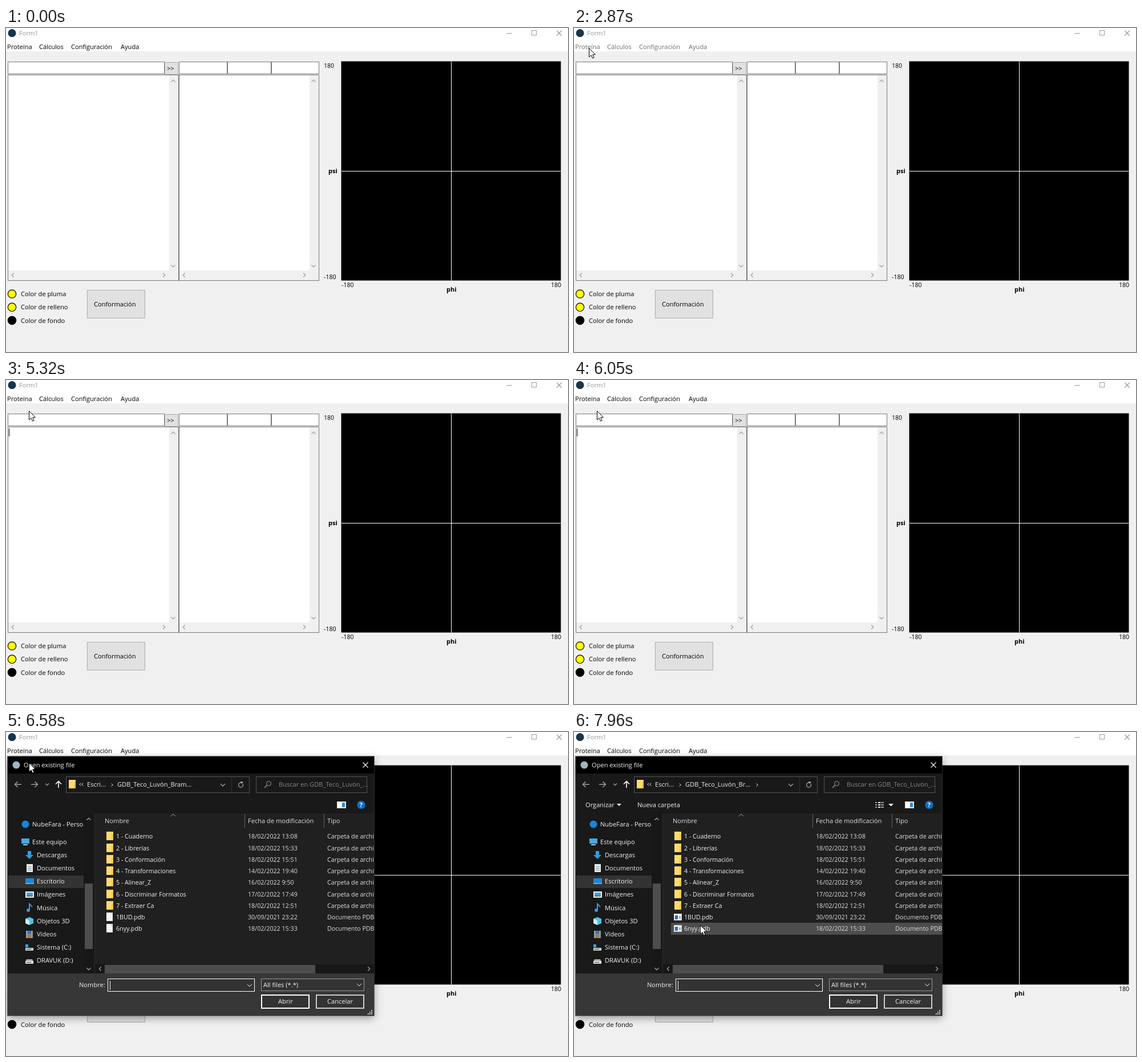
These frames come from a looping animation (985 by 569 pixels, 8 s). An HTML page with a canvas:

```html
<!DOCTYPE html>
<html lang="es">
<head>
<meta charset="utf-8">
<title>Form1</title>
<style>
html, body { margin: 0; width: 100%; height: 100%; overflow: hidden; background: #f0f0f0; }
canvas { display: block; width: 985px; height: 569px; }
</style>
</head>
<body>
<canvas id="stage" width="985" height="569"></canvas>
<script>
const LOOP = 8000;
const stage = document.getElementById('stage');
const screen2d = stage.getContext('2d');
const layer = document.createElement('canvas');
layer.width = stage.width;
layer.height = stage.height;
const layer2d = layer.getContext('2d');
let g = screen2d;

const clamp = v => Math.max(0, Math.min(1, v));
const ramp = (t, a, b) => clamp((t - a) / (b - a));
const within = (p, x, y, w, h) => p && p.x >= x && p.x < x + w && p.y >= y && p.y < y + h;

function fill(x, y, w, h, color) {
  g.fillStyle = color;
  g.fillRect(x, y, w, h);
}

function frame(x, y, w, h, border, color, lw = 1) {
  if (color) fill(x, y, w, h, color);
  g.strokeStyle = border;
  g.lineWidth = lw;
  g.strokeRect(x + lw / 2, y + lw / 2, w - lw, h - lw);
}

// y is the optical middle of the line
function text(s, x, y, color = '#000', size = 11.1, weight = 400) {
  g.font = `${weight} ${size}px "Open Sans", "Noto Sans", sans-serif`;
  g.fillStyle = color;
  g.fillText(s, x, y + 4);
}

function line(color, lw, ...pts) {
  g.strokeStyle = color;
  g.lineWidth = lw;
  g.beginPath();
  for (let i = 0; i < pts.length; i += 2) g.lineTo(pts[i], pts[i + 1]);
  g.stroke();
}

function shape(color, ...pts) {
  g.fillStyle = color;
  g.beginPath();
  for (let i = 0; i < pts.length; i += 2) g.lineTo(pts[i], pts[i + 1]);
  g.closePath();
  g.fill();
}

function disc(x, y, r, color, border) {
  g.beginPath();
  g.arc(x, y, r, 0, 7);
  g.fillStyle = color;
  g.fill();
  if (border) {
    g.strokeStyle = border;
    g.lineWidth = 1.2;
    g.stroke();
  }
}

function chevron(x, y, dir, color, s = 3.5, lw = 1.3) {
  const h = s / 2;
  if (dir === 'up') line(color, lw, x - s, y + h, x, y - h, x + s, y + h);
  if (dir === 'down') line(color, lw, x - s, y - h, x, y + h, x + s, y - h);
  if (dir === 'left') line(color, lw, x + h, y - s, x - h, y, x + h, y + s);
  if (dir === 'right') line(color, lw, x - h, y - s, x + h, y, x - h, y + s);
}

function cross(x, y, r, color) {
  line(color, 1.1, x - r, y - r, x + r, y + r);
  line(color, 1.1, x + r, y - r, x - r, y + r);
}

// ---- pointer: start, end, steps, then a quadratic curve ----
const moves = [
  [650, 1280, 10, 952, 559, 690, 468, 439, 495],
  [1550, 2310, 11, 439, 495, 250, 180, 62, 59],
  [2380, 2590, 4, 62, 59, 35, 22, 26, 35],
  [3970, 4650, 9, 26, 35, 32, 50, 28, 42],
  [4920, 4920, 1, 28, 42, 34, 44, 40, 46],
  [5060, 5320, 5, 40, 46, 40, 50, 40, 54],
  [7110, 7890, 12, 40, 54, 130, 165, 224, 330],
  [7960, 7960, 1, 224, 330, 222, 335, 221, 339]
];

function pointerAt(t) {
  if (t < 450) return null;
  let pos = { x: 952, y: 559 };
  for (const [a, b, n, x0, y0, cx, cy, x1, y1] of moves) {
    if (t < a) break;
    const k = n > 1 ? Math.min(n, 1 + Math.floor((t - a) / (b - a) * (n - 1) + 1e-6)) : 1;
    const u = k / n, p = u * u * (3 - 2 * u), q = 1 - p;
    pos = {
      x: Math.round(q * q * x0 + 2 * p * q * cx + p * p * x1),
      y: Math.round(q * q * y0 + 2 * p * q * cy + p * p * y1)
    };
  }
  return pos;
}

function drawPointer({ x, y }) {
  g.save();
  g.translate(x + .5, y + .5);
  g.beginPath();
  [[0, 0], [0, 15.5], [3.6, 12.2], [6, 17.6], [8.6, 16.5], [6.2, 11.3], [10.8, 11.1]]
    .forEach(p => g.lineTo(...p));
  g.closePath();
  g.fillStyle = '#fff';
  g.fill();
  g.strokeStyle = '#000';
  g.lineWidth = 1;
  g.stroke();
  g.restore();
}

// ---- main window ----
function field(p, x, y, w, h) {
  frame(x, y, w, h, within(p, x, y, w, h) ? '#171717' : '#7a7a7a', '#fff');
}

function memo(p, x, w) {
  field(p, x, 82, w, 362);
  const r = x + w - 1, c = '#a3a3a3';
  fill(r - 16, 83, 16, 360, '#f0f0f0');
  fill(x + 1, 426, w - 2, 17, '#f0f0f0');
  chevron(r - 9, 93, 'up', c);
  chevron(r - 9, 418, 'down', c);
  chevron(x + 9, 434, 'left', c);
  chevron(r - 25, 434, 'right', c);
}

function drawMenu(t) {
  const a = ramp(t, 3080, 3290);
  if (a <= 0 || t >= 5130) return;
  g.globalAlpha = a;
  frame(0, 42, 154, 28, '#ccc', '#f2f2f2');
  g.globalAlpha = a * ramp(t, 3970, 4200);
  fill(3, 45, 148, 22, '#91c9f7');
  g.globalAlpha = a;
  text('Abrir archivo', 32, 56);
  g.globalAlpha = 1;
}

function drawMain(t, p) {
  const active = t >= 3010 && t < 5200;
  const ink = active ? '#000' : '#999';
  const over = t < 6050 ? p : null;
  fill(0, 0, 985, 569, '#f0f0f0');
  fill(0, 0, 985, 41, '#fff');
  disc(10.5, 9, 7, '#1c3446');
  text('Form1', 23, 9, ink);
  line(ink, 1, 877, 9.5, 887, 9.5);
  frame(921, 4, 9, 9, ink);
  cross(969.5, 9, 4.5, ink);

  if (t >= 3080 && t < 5130) frame(0, 25, 50, 17, '#99d1ff', '#cce8ff');
  const menuInk = t >= 2450 && t < 3010 ? '#6d6d6d' : '#000';
  text('Proteína', 2, 33, menuInk);
  text('Cálculos', 58, 33, menuInk);
  text('Configuración', 114, 33, menuInk);
  text('Ayuda', 201, 33, menuInk);

  field(over, 3, 59, 275, 22);
  frame(278, 60, 24, 22, '#adadad', '#e1e1e1');
  text('>>', 282, 71);
  field(over, 303, 59, 85, 22);
  field(over, 388, 59, 77, 22);
  field(over, 465, 59, 84, 22);
  memo(over, 3, 300);
  memo(over, 303, 246);

  const focus = Math.min(ramp(t, 2940, 3290), 1 - ramp(t, 5060, 5320));
  if (focus > 0) {
    g.globalAlpha = focus;
    frame(3, 82, 300, 362, '#0078d7');
    g.globalAlpha = 1;
  }
  if (t >= 3080) fill(5, 85, 1, 14, '#000');

  fill(587.5, 58.5, 385, 385, '#000');
  fill(780, 59, 1, 384, '#fff');
  fill(588, 251, 384, 1, '#fff');
  text('180', 557, 66, '#000', 10.6);
  text('-180', 557, 437, '#000', 10.6);
  text('-180', 588, 451, '#000', 10.6);
  text('180', 955, 451, '#000', 10.6);
  text('psi', 565, 251, '#000', 11, 700);
  text('phi', 772, 459, '#000', 11, 700);

  [['pluma', '#ff0'], ['relleno', '#ff0'], ['fondo', '#000']].forEach(([s, c], i) => {
    const y = 467 + i * 23.3;
    disc(10.5, y, 7.2, c, '#000');
    text('Color de ' + s, 26, Math.round(y));
  });
  frame(142, 460, 102, 50, '#adadad', '#e1e1e1');
  text('Conformación', 154, 485);
  drawMenu(t);
}

// ---- file dialog ----
const box = { x: 3, y: 43, w: 642, h: 455 };
const folders = ['1 - Cuaderno', '2 - Librerías', '3 - Conformación', '4 - Transformaciones',
  '5 - Alinear_Z', '6 - Discriminar Formatos', '7 - Extraer Ca'];
const files = [...folders, '1BUD.pdb', '6nyy.pdb'];
const dates = ['18/02/2022 13:08', '18/02/2022 15:33', '18/02/2022 15:51', '14/02/2022 19:40',
  '16/02/2022 9:50', '17/02/2022 17:49', '18/02/2022 12:51', '30/09/2021 23:22', '18/02/2022 15:33'];
const places = ['Este equipo', 'Descargas', 'Documentos', 'Escritorio', 'Imágenes', 'Música',
  'Objetos 3D', 'Vídeos', 'Sistema (C:)', 'DRAVUK (D:)'];
const pale = '#f2f2f2', dim = '#a0a0a0';

function folder(x, y) {
  fill(x, y, 12, 15, '#ffd971');
  fill(x + 9, y + 4, 3, 11, '#f5c64f');
}

const placeIcons = [
  y => { fill(27, y - 6, 14, 9, '#4aa8e0'); fill(30, y + 4, 8, 2, '#9bd0ee'); },
  y => shape('#2f9be6', 38, y - 7, 44, y - 7, 44, y, 48, y, 41, y + 7, 34, y, 38, y),
  y => { fill(36, y - 7, 11, 14, '#eee'); [-3, 0, 3].forEach(d => fill(38, y + d, 7, 1, '#6b8ba0')); },
  y => { fill(34, y - 5, 15, 10, '#1c87d6'); fill(34, y + 3, 15, 2, '#55b5f0'); },
  y => { fill(34, y - 5, 15, 11, '#eee'); fill(36, y - 3, 11, 7, '#4aa0d8'); fill(36, y + 2, 11, 2, '#3d7c68'); },
  y => { disc(39, y + 4, 3, '#2f9be6'); line('#2f9be6', 2, 41, y + 4, 41, y - 7, 46, y - 2); },
  y => { shape('#4fc3e8', 41, y - 7, 48, y - 4, 48, y + 4, 41, y + 7, 34, y + 4, 34, y - 4);
         shape('#c9f0fb', 34, y - 4, 41, y - 1, 41, y + 7, 34, y + 4); },
  y => { fill(35, y - 6, 12, 13, '#8d9aa5'); fill(38, y - 6, 6, 6, '#2f78b8'); fill(38, y + 1, 6, 6, '#b8763f'); },
  y => { fill(34, y - 5, 5, 5, '#36a3e8'); fill(34, y + 1, 14, 5, '#ccc'); fill(36, y + 3, 8, 1, '#444'); },
  y => { shape('#aaa', 36, y - 2, 46, y - 2, 48, y + 2, 34, y + 2); fill(34, y + 1, 14, 5, '#ddd'); fill(36, y + 3, 8, 1, '#444'); }
];

function drawTitle() {
  fill(box.x, box.y, box.w, 30, '#000');
  disc(18, 58, 6.5, '#9fb6c4');
  text('Open existing file', 31, 58, pale);
  cross(630, 58, 4.5, '#fff');
}

function drawBlank() {
  fill(box.x, 73, box.w, 351, '#fff');
  fill(173, 408, 455, 16, '#171717');
  fill(173, 408, 368, 16, '#4d4d4d');
  [[128, 437, 45, 14], [178, 433, 258, 23], [447, 433, 181, 22], [447, 461, 85, 25],
   [543, 461, 85, 25], [628, 481, 17, 17]].forEach(r => fill(...r, '#fff'));
}

function drawNav(ready) {
  line(dim, 1.5, 27, 92, 16, 92);
  chevron(18, 92, 'left', dim, 5, 1.5);
  line(dim, 1.5, 44, 92, 55, 92);
  chevron(53, 92, 'right', dim, 5, 1.5);
  chevron(72, 92, 'down', dim, 3);
  line('#fff', 1.6, 92, 98, 92, 87);
  chevron(92, 89, 'up', '#fff', 5, 1.6);
  frame(105, 78, 322, 29, '#535353', '#191919');
  folder(110, 84);
  chevron(130, 92, 'left', pale, 2.5, 1);
  chevron(134, 92, 'left', pale, 2.5, 1);
  text('Escri...', 142, 92, pale);
  chevron(186, 93, 'right', pale, 2.5, 1);
  text(ready ? 'GDB_Teco_Luvón_Br...' : 'GDB_Teco_Luvón_Bram...', 195, 92, pale);
  if (ready) chevron(321, 93, 'right', pale, 2.5, 1);
  chevron(380, 93, 'down', dim, 4);
  fill(395, 79, 1, 27, '#333');
  g.strokeStyle = dim;
  g.lineWidth = 1.3;
  g.beginPath();
  g.arc(411.5, 93, 4, -.6, 4.6);
  g.stroke();
  fill(411, 87, 4, 3, dim);
  frame(438, 78, 195, 29, '#535353', '#191919');
  g.strokeStyle = dim;
  g.beginPath();
  g.arc(460.5, 90.5, 4, 0, 7);
  g.stroke();
  line(dim, 1.3, 457.5, 93.5, 453, 98);
  text('Buscar en GDB_Teco_Luvón_...', 478, 92, '#868686');

  if (ready) {
    text('Organizar', 20, 128, pale);
    shape(pale, 75, 126, 83, 126, 79, 130);
    text('Nueva carpeta', 111, 128, pale);
    [123, 127, 131].forEach(y => {
      fill(528, y, 3, 2, dim);
      fill(533, y, 4, 2, pale);
      fill(538, y, 5, 2, dim);
    });
    shape(pale, 551, 126, 560, 126, 555.5, 130.5);
  }
  frame(580, 122, 16, 12, '#ddd', '#fff');
  fill(589, 124, 5, 8, '#2f86c9');
  disc(622.5, 128, 7.3, '#0f6cbf');
  text('?', 619.8, 128, '#fff', 11, 700);
}

function drawSide() {
  fill(4, 252, 132, 22, '#333');
  disc(34, 162, 6.5, '#1b84d8');
  g.save();
  g.beginPath();
  g.rect(3, 143, 133, 281);
  g.clip();
  text('NubeFara - Personal', 46, 162, pale);
  places.forEach((s, i) => {
    const y = Math.round(193 + i * 23.1);
    placeIcons[i](y);
    text(s, i ? 54 : 46, y, pale);
  });
  g.restore();
  fill(137, 144, 16, 280, '#171717');
  fill(138, 266, 14, 115, '#4d4d4d');
  chevron(145, 153, 'up', dim);
  chevron(145, 416, 'down', dim);
  fill(155, 143, 1, 281, '#2b2b2b');
}

function drawList(ready, p) {
  const size = 10.7;
  fill(156, 143, 489, 281, '#202020');
  chevron(293, 146, 'up', dim, 4, 1);
  fill(418, 144, 1, 24, '#636363');
  fill(557, 144, 1, 24, '#636363');
  text('Nombre', 173, 156, '#dedede');
  text('Fecha de modificación', 424, 156, '#dedede');
  text('Tipo', 563, 156, '#dedede');
  files.forEach((s, i) => {
    const y = Math.round(183.4 + i * 20.25), top = y - 10;
    if (within(p, 170, top, 475, 20)) fill(170, top, 475, 21, '#4d4d4d');
    if (i < folders.length) folder(176, y - 8);
    else if (ready) {
      frame(175, y - 6, 14, 12, '#ccc', '#fff');
      fill(177, y - 3, 5, 7, '#2b6cb0');
      fill(184, y - 2, 3, 5, '#9ab');
    } else {
      fill(176, y - 8, 11, 15, '#f4f4f4');
      shape('#bbb', 184, y - 8, 187, y - 5, 184, y - 5);
    }
    text(s, 193, y, pale, size);
    text(dates[i], 424, y, '#dedede', size);
    text(i < folders.length ? 'Carpeta de archivos' : 'Documento PDB', 563, y, '#dedede', size);
  });
  fill(156, 408, 489, 16, '#171717');
  fill(173, 409, 369, 15, '#4d4d4d');
  chevron(165, 416, 'left', dim);
  chevron(636, 416, 'right', dim);
}

function drawFooter(t) {
  text('Nombre:', 128, 444, pale);
  frame(178, 433, 258, 23, '#fff', '#333');
  if (Math.floor((t - 6580) / 530) % 2 === 0) fill(182, 437, 1, 16, '#fff');
  chevron(427, 445, 'down', pale, 4, 1);
  frame(447, 433, 181, 22, '#9b9b9b', '#333');
  text('All files (*.*)', 451, 444, pale);
  chevron(619, 444, 'down', pale, 4, 1);
  frame(447, 461, 85, 25, '#fff', '#333', 2);
  text('Abrir', 477, 473, pale);
  frame(543, 461, 85, 25, '#ccc', '#333', 2);
  text('Cancelar', 563, 473, pale);
  for (let r = 0; r < 3; r++)
    for (let c = 2 - r; c < 3; c++) fill(634 + c * 3, 488 + r * 3, 2, 2, '#ccc');
}

function drawDialog(t, p) {
  const held = 6190 + Math.floor((t - 6190) / 70) * 70;
  const left = Math.pow(1 - ramp(held, 6050, 6334), 3);
  if (left >= 1) return;
  const { x, y, w, h } = box;
  g = layer2d;
  g.clearRect(0, 0, 985, 569);
  g.save();
  frame(x - 1, y - 1, w + 2, h + 2, 'rgba(67,67,67,.7)');
  g.beginPath();
  g.rect(x, y, w, h);
  g.clip();
  fill(x, 73, w, 351, '#191919');
  fill(x, 424, w, 74, '#373737');
  drawTitle();
  if (t < 6580) drawBlank();
  else {
    const ready = t >= 6650;
    drawNav(ready);
    drawSide();
    drawList(ready, p);
    drawFooter(t);
  }
  g.restore();

  g = screen2d;
  const s = 1 - .04 * left, cx = x + w / 2, cy = y + h / 2;
  g.save();
  g.translate(cx, cy);
  g.scale(s, s);
  g.translate(-cx, -cy);
  g.globalAlpha = 1 - left;
  // the shadow falls only outside the dialog
  g.save();
  g.beginPath();
  g.rect(-50, -50, 1100, 700);
  g.rect(x, y, w, h);
  g.clip('evenodd');
  g.shadowColor = 'rgba(0,0,0,.4)';
  g.shadowBlur = 14;
  g.shadowOffsetY = 4;
  fill(x, y, w, h, '#000');
  g.restore();
  g.drawImage(layer, 0, 0);
  g.restore();
}

function draw(t) {
  const p = pointerAt(t);
  drawMain(t, p);
  drawDialog(t, p);
  if (p) drawPointer(p);
}

const begin = performance.now();
function tick() {
  draw((performance.now() - begin) % LOOP);
  requestAnimationFrame(tick);
}
tick();
</script>
</body>
</html>
```
